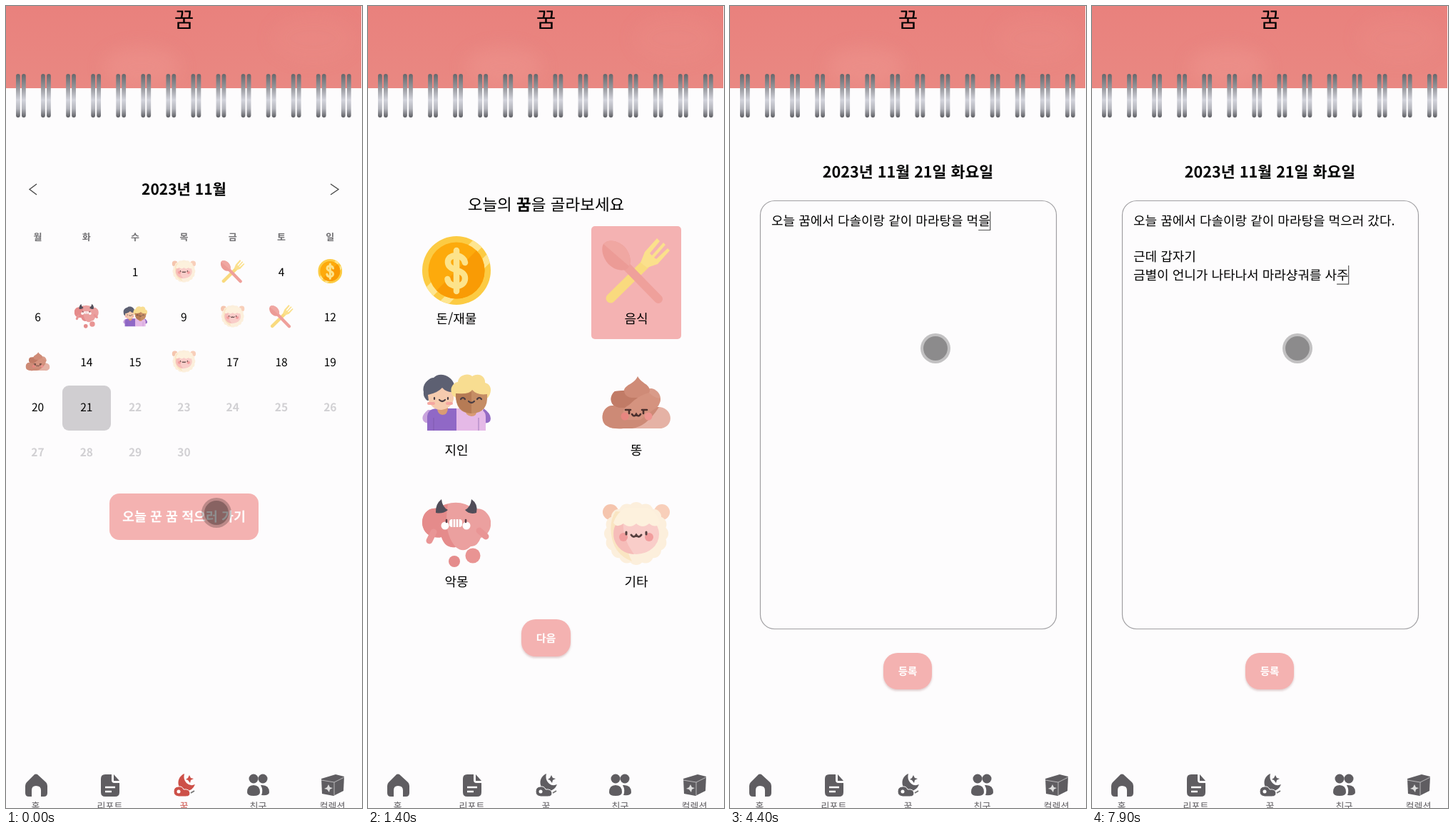
Recreate the animation shown at these times as an HTML page. Size 499 by 1122 pixels, loop 8 s.

```html
<!DOCTYPE html>
<html lang="ko">
<head>
<meta charset="utf-8">
<title>꿈 일기</title>
<style>
html, body { margin: 0; height: 100%; overflow: hidden; background: #fdfcfd; }
svg { display: block; width: 100vw; height: 100vh; }
text { font-family: "Noto Sans CJK KR", "Noto Sans CJK", sans-serif; white-space: pre; text-rendering: geometricPrecision; }
</style>
</head>
<body>
<svg id="stage" viewBox="0 0 499 1122">
<defs>
  <linearGradient id="metal" x2="0" y2="1">
    <stop offset="0" stop-color="#66676b"/><stop offset=".3" stop-color="#929398"/>
    <stop offset=".6" stop-color="#d3d4dc"/><stop offset=".8" stop-color="#b4b5bc"/>
    <stop offset="1" stop-color="#5c5d62"/>
  </linearGradient>
  <linearGradient id="cover" x2="0" y2="1">
    <stop offset="0" stop-color="#e9817d"/><stop offset="1" stop-color="#e98882"/>
  </linearGradient>
  <filter id="soft" x="-50%" y="-50%" width="200%" height="200%"><feGaussianBlur stdDeviation="12"/></filter>
  <filter id="shadow" x="-20%" y="-20%" width="140%" height="150%">
    <feDropShadow dx="0" dy="2" stdDeviation="1.8" flood-color="#a77" flood-opacity=".38"/>
  </filter>
  <clipPath id="coverClip"><path d="M0 0H498V115H0z"/></clipPath>
  <clipPath id="coinClip"><circle cx="48" cy="48" r="48"/></clipPath>

  <symbol id="money" viewBox="0 0 96 96">
    <circle cx="48" cy="48" r="48" fill="#fccb43"/>
    <path d="M-5 82 82 -5 92 7 7 92z M16 100 100 16V32L32 100z" fill="#fee58f" clip-path="url(#coinClip)"/>
    <circle cx="48" cy="48" r="39.5" fill="#fdaa0c"/>
    <path d="M20 76A39.5 39.5 0 0 0 76 20z" fill="#f99b05"/>
    <g fill="none" stroke="#fde38b" stroke-width="8.5" stroke-linecap="round">
      <path d="M48 20V77"/>
      <path d="M60 37C58 24 35 24 36 37C37 50 60 45 60 59C60 73 37 73 35.5 60"/>
    </g>
  </symbol>

  <symbol id="food" viewBox="0 0 96 96">
    <path d="M12 87 66 34" stroke="#f9da7e" stroke-width="13" stroke-linecap="round"/>
    <path d="M54 37 60 22 77 3 81 7 67 24 70 27 86 9 89 12 73 30 76 32 92 17 95 20 78 39 63 44z" fill="#fbe08c"/>
    <path d="M31 39 79 88" stroke="#efa09b" stroke-width="12" stroke-linecap="round"/>
    <path d="M2 11C10 2 27 8 34 18C42 30 41 41 35 46C25 51 10 44 4 32C0 24-1 16 2 11z" fill="#ec9b96"/>
    <path d="M2 11C10 2 27 8 34 18C40 26 41 35 38 42z" fill="#f0a7a2"/>
  </symbol>

  <symbol id="friends" viewBox="0 0 96 96">
    <path d="M8 59Q-3 68 2 75Q7 80 15 75L23 59z" fill="#c9a4dd"/>
    <path d="M86 57Q99 66 95 75Q90 80 80 75z" fill="#956cc5"/>
    <path d="M7 88V68Q8 57 22 57H49V88z" fill="#9068c6"/>
    <path d="M48 88V57H73Q89 57 89 69V88z" fill="#e5b9e7"/>
    <path d="M16 88V70M79 88V70" stroke="#76529f" stroke-width="1.2" opacity=".5"/>
    <path d="M21 56H36Q36 66 28 66Q21 65 21 56zM60 58H77Q77 68 69 68Q60 67 60 58z" fill="#d99b74"/>
    <path d="M2 34C-1 24 9 14 16 14C24 5 42 11 45 24L43 42 7 46Q1 41 2 34z" fill="#5d6072"/>
    <path d="M8 38Q22 35 28 28Q34 35 44 34V44A18 18 0 0 1 9 46z" fill="#f6cbae"/>
    <path d="M43 39C36 29 45 20 50 20C51 9 66 7 70 12C80 6 89 13 88 21C99 24 97 36 92 42H47z" fill="#f8dd91"/>
    <path d="M47 36Q66 38 70 31Q77 39 91 37Q93 64 69 64Q46 64 47 36z" fill="#c58d65"/>
    <path d="M47 39Q48 62 69 64V33Q65 38 47 36z" fill="#b67b55"/>
    <path d="M17 42v2M36 42v2M24 45q4 4 8 0M54 44q3-4 6 0M77 44q3-4 6 0M65 47q4 4 8 0" fill="none" stroke="#4a3d43" stroke-width="2.2" stroke-linecap="round"/>
    <path d="M9 50h7M35 50h6" stroke="#f5a6a0" stroke-width="4" stroke-linecap="round"/>
  </symbol>

  <symbol id="poop" viewBox="0 0 96 96">
    <path d="M14 53C-1 54-4 77 8 82Q14 86 30 85H77C101 87 102 58 81 55z" fill="#e5b2a5"/>
    <path d="M14 53C-1 54-4 77 8 82Q14 86 30 85H42Q62 83 80 55z" fill="#cd8a76"/>
    <path d="M18 33C9 40 11 55 25 56H70C89 52 83 31 69 29z" fill="#d99b89"/>
    <path d="M18 33C9 40 11 55 25 56H39Q57 48 61 29z" fill="#c17b66"/>
    <path d="M50 12C45 23 34 23 31 31Q31 43 47 42Q65 43 67 32C67 23 55 22 50 12z" fill="#cf8b77"/>
    <path d="M38 52Q52 38 66 35Q72 42 82 43Q82 54 72 59Q65 64 54 73H32Q25 58 38 52z" fill="#d5937f"/>
    <circle cx="32" cy="68" r="5.5" fill="#e88680"/><circle cx="65" cy="68" r="5.5" fill="#ee948f"/>
    <path d="M33 59h7M38 59v5M56 59h7M58 59v5M42 65q3 5 6 0q3 5 6 0" fill="none" stroke="#4b302e" stroke-width="2.6" stroke-linecap="round"/>
  </symbol>

  <symbol id="nightmare" viewBox="0 0 96 96">
    <path d="M20 13C5 11-3 27 1 39C5 52 18 55 27 53Q32 69 47 67Q58 76 68 66Q77 67 82 54C96 50 101 31 91 20Q84 11 73 14Q49-4 20 13z" fill="#eba09f"/>
    <path d="M20 13C5 11-3 27 1 39C5 52 18 55 27 53Q32 69 47 67Q29 47 36 7Q27 8 20 13z" fill="#e58b8b"/>
    <path d="M16 46 10 58M80 44 89 52" stroke="#e99595" stroke-width="9" stroke-linecap="round"/>
    <path d="M19 19Q18 7 27 0Q28 11 36 15Q29 21 19 19zM76 19Q79 7 69 0Q68 11 60 15Q66 22 76 19z" fill="#514d59"/>
    <circle cx="32" cy="37" r="5.5" fill="#fff"/><circle cx="62" cy="37" r="5.5" fill="#fff"/>
    <path d="M34 32v-3M61 32v-3" stroke="#5a3e46" stroke-width="2.5" stroke-linecap="round"/>
    <rect x="38" y="28" width="18" height="11" rx="4" fill="#fff"/>
    <path d="M43 28v11M47 28v11M51 28v11" stroke="#d77d7d"/>
    <circle cx="45" cy="87" r="8" fill="#e58c8c"/><circle cx="71" cy="79" r="10.5" fill="#e99493"/>
  </symbol>

  <symbol id="other" viewBox="0 0 96 96">
    <circle cx="12" cy="18" r="11" fill="#f5c5ae"/><circle cx="84" cy="18" r="11" fill="#f8cfba"/>
    <g id="wool" fill="#fcefdc"></g>
    <path d="M19 17Q9 32 14 55Q19 78 42 87Q28 62 34 18z" fill="#fae5c2"/>
    <ellipse cx="48" cy="49" rx="32" ry="28" fill="#f9cdc9"/>
    <path d="M30 26Q13 34 17 56Q24 76 45 77Q27 54 30 26z" fill="#f6bdb9"/>
    <path d="M16 33Q20 20 32 12H64Q78 18 81 34Q75 41 66 34Q57 42 48 34Q39 42 30 34Q21 41 16 33z" fill="#fdf1dd"/>
    <circle cx="30" cy="53" r="6" fill="#f19d9d"/><circle cx="66" cy="53" r="6" fill="#f19d9d"/>
    <path d="M34 46v3M62 46v3M41 50q3.500 5 7 0q3.500 5 7 0" fill="none" stroke="#56403f" stroke-width="3" stroke-linecap="round"/>
  </symbol>
</defs>

<rect width="499" height="1122" fill="#fdfcfd"/>
<g clip-path="url(#coverClip)">
  <rect width="499" height="115" fill="url(#cover)"/>
  <g fill="#f3a19a" opacity=".3" filter="url(#soft)">
    <ellipse cx="190" cy="85" rx="55" ry="28"/>
    <ellipse cx="430" cy="45" rx="60" ry="35" opacity=".4"/>
  </g>
</g>
<g id="heading"></g>
<g id="rings" fill="url(#metal)"></g>
<g id="calendar"></g>
<g id="picker"></g>
<g id="diary"></g>
<g id="nav" fill="#5f5d61"></g>
<g id="touch"><circle r="21" opacity=".23"/><circle r="17" opacity=".28"/></g>
</svg>

<script>
const $ = id => document.getElementById(id);
const label = (x, y, size, str, attrs = '') =>
  `<text x="${x}" y="${y + size * .37}" font-size="${size}" text-anchor="middle" ${attrs}>${str}</text>`;
const icon = (name, x, y, size) =>
  `<use href="#${name}" x="${x - size / 2}" y="${y - size / 2}" width="${size}" height="${size}"/>`;
const button = (x, y, w, h, r, size, str, attrs = '') =>
  `<rect x="${x}" y="${y}" width="${w}" height="${h}" rx="${r}" fill="#f4b2b1" ${attrs}/>` +
  label(x + w / 2, y + h / 2, size, str, 'fill="#fff" font-weight="700"');
const times = (n, fn) => Array.from({ length: n }, (_, i) => fn(i)).join('');

$('heading').innerHTML = label(249.5, 19, 30, '꿈', 'font-weight="500"');
$('wool').innerHTML = '<circle cx="48" cy="48" r="41"/>' + times(16, i => {
  const a = i / 16 * Math.PI * 2;
  return `<circle cx="${48 + 34 * Math.cos(a)}" cy="${48 + 33 * Math.sin(a)}" r="11"/>`;
});
$('rings').innerHTML = times(14, i => [14, 22].map(x =>
  `<rect x="${x + i * 35.07}" y="95" width="5.8" height="61" rx="2.9"/>`).join(''));

// Month view
const dreams = { 2: 'other', 3: 'food', 5: 'money', 7: 'nightmare', 8: 'friends', 10: 'other', 11: 'food', 13: 'poop', 16: 'other' };
const columnX = c => 44.5 + c * 68.3;
$('calendar').innerHTML =
  label(249.5, 256, 21, '2023년 11월', 'font-weight="700"') +
  '<path d="M43 249 33 256.500 43 264M455 249 466 256.500 455 264" fill="none" stroke="#444" stroke-width="1.3"/>' +
  [...'월화수목금토일'].map((d, c) => label(columnX(c), 323, 13, d, 'font-weight="700" fill="#717073"')).join('') +
  '<rect x="79" y="531" width="68" height="63" rx="9" fill="#d0ced1"/>' +
  times(30, i => {
    const day = i + 1, cell = i + 2, x = columnX(cell % 7), y = 372 + Math.floor(cell / 7) * 63;
    return dreams[day] ? icon(dreams[day], x, y - 1, 34)
      : label(x, y, 15.5, day, day > 21 ? 'fill="#d1d0d3" font-weight="700"' : '');
  }) +
  button(145, 682, 209, 65, 14, 18.4, '오늘 꾼 꿈 적으러 가기');

// Dream type picker
const kinds = [['money', '돈/재물'], ['food', '음식'], ['friends', '지인'], ['poop', '똥'], ['nightmare', '악몽'], ['other', '기타']];
$('picker').innerHTML =
  label(249.5, 278, 22.5, '오늘의 <tspan font-weight="700">꿈</tspan>을 골라보세요') +
  '<rect id="choice" y="308" width="126" height="158" rx="5" fill="#f4b2b2"/>' +
  kinds.map(([name, str], i) => {
    const x = i % 2 ? 376 : 124, y = 370 + Math.floor(i / 2) * 184;
    return icon(name, x, y, 96) + label(x, y + 67, 18, str);
  }).join('') +
  button(215, 858, 69, 52, 20, 15, '다음', 'filter="url(#shadow)"');

// Diary page
const LINE = 25.2;
$('diary').innerHTML =
  label(249.5, 232, 21.6, '2023년 11월 21일 화요일', 'font-weight="700"') +
  '<rect x="42.5" y="272.5" width="415" height="599" rx="20" fill="none" stroke="#a09fa2" stroke-width="1.2"/>' +
  times(4, i => `<text class="line" x="58" y="${307 + i * LINE}" font-size="18"></text>`) +
  '<path id="caret" fill="none" stroke="#555" stroke-width="1.2"/>' +
  button(215, 905, 68, 51, 20, 14.5, '등록', 'filter="url(#shadow)"');

// Bottom bar
const tabs = [
  ['홈', '<path d="M40 1075Q42 1074 44 1075L56 1086Q58 1088 58 1091V1101Q58 1106 53 1106H49V1097Q49 1091 42 1091Q36 1091 36 1097V1106H32Q27 1106 27 1101V1091Q27 1088 29 1086z"/>'],
  ['리포트', '<path d="M139 1075H148V1083Q148 1087 152 1087H159V1100Q159 1106 153 1106H139Q133 1106 133 1100V1081Q133 1075 139 1075zM151 1075 159 1084H151z"/><path d="M139 1093h14M139 1099h9" stroke="#fff" stroke-width="2.5"/>'],
  ['꿈', '<path d="M250 1074C238 1079 239 1096 251 1098Q261 1099 265 1089Q258 1092 253 1087Q248 1082 250 1074zM257 1076l2 4 4 1-4 2-1 4-3-4-3-1 3-2z"/><path d="M235 1099Q235 1093 241 1092Q247 1091 249 1096Q257 1095 258 1101Q258 1106 252 1106H242Q235 1105 235 1099z" stroke="#fdfcfd"/><circle cx="242" cy="1099" r="2.5" fill="#fff"/><path d="M259 1101l5-3" stroke="#777" stroke-width="2"/>'],
  ['친구', '<circle cx="347" cy="1081" r="6.5"/><circle cx="360" cy="1081" r="6.5"/><path d="M338 1100Q338 1090 347 1090Q356 1090 356 1100Q356 1105 347 1105Q338 1105 338 1100zM357 1090Q369 1089 369 1100Q369 1105 358 1104Q361 1097 357 1090z"/>'],
  ['컬렉션', '<path d="M442 1081 462 1075 474 1078 473 1098 459 1105 443 1102z"/><path d="M442 1083 460 1086 474 1079M460 1086V1104" fill="none" stroke="#b9b8ba"/><path d="M452 1089l2 4 4 1-4 2-1 4-3-4-4-1 4-2z" fill="#ddd"/>']
];
$('nav').innerHTML = tabs.map(([str, shape], i) => `<g>${shape}${label(41.5 + i * 104, 1119, 13, str)}</g>`).join('');
const dreamTab = $('nav').children[2];

// Korean input: every key press yields one state of the text
const INITIALS = 'ㄱㄲㄴㄷㄸㄹㅁㅂㅃㅅㅆㅇㅈㅉㅊㅋㅌㅍㅎ';
const FINALS = ' ㄱㄲㄳㄴㄵㄶㄷㄹㄺㄻㄼㄽㄾㄿㅀㅁㅂㅄㅅㅆㅇㅈㅊㅋㅌㅍㅎ';
const HANGUL = 0xAC00;
const isHangul = ch => /[가-힣]/.test(ch);

function keyStates(before, chunk) {
  const states = [before];
  let text = before;
  for (const ch of chunk) {
    if (isHangul(ch)) {
      const code = ch.charCodeAt(0) - HANGUL, final = code % 28;
      const first = INITIALS[Math.floor(code / 588)];
      const last = text.slice(-1), slot = FINALS.indexOf(first);
      const open = isHangul(last) && (last.charCodeAt(0) - HANGUL) % 28 === 0 && slot > 0;
      states.push(open ? text.slice(0, -1) + String.fromCharCode(last.charCodeAt(0) + slot) : text + first);
      if (final) states.push(text + String.fromCharCode(HANGUL + code - final));
    }
    text += ch;
    states.push(text);
  }
  return states;
}

let typed = '';
const typing = [
  [2200, 3100, '오늘 꿈에서 다'], [3100, 4000, '솔이랑 같이 마라탕'],
  [4000, 4350, '을 먹으'], [4350, 4900, '러 갔다.'],
  [4900, 5900, '\n\n근데 갑자기\n금'], [5900, 6500, '별이 언니가 '],
  [6600, 7000, '나타나서 '], [7100, 7900, '마라샹궈를 사주']
].map(([start, end, chunk]) => {
  const states = keyStates(typed, chunk);
  typed += chunk;
  return { start, end, states };
});

function textAt(t) {
  const part = typing.filter(p => t >= p.start).pop();
  if (!part) return '';
  const progress = Math.min(1, (t - part.start) / (part.end - part.start));
  return part.states[Math.ceil(progress * (part.states.length - 1))];
}

const lineNodes = document.querySelectorAll('.line');

function drawDiary(t) {
  const lines = textAt(t).split('\n');
  lineNodes.forEach((node, i) => node.textContent = lines[i] || '');
  const row = lines.length - 1, line = lines[row], node = lineNodes[row];
  const widthOf = count => count ? node.getSubStringLength(0, count) : 0;
  const composing = /[가-힣ㄱ-ㅎ]$/.test(line);
  const end = 58 + widthOf(line.length), top = 287.5 + row * LINE;
  const start = composing ? 58 + widthOf(line.length - 1) : end;
  $('caret').setAttribute('d', t < 1900 ? '' : `M${end} ${top}V${top + 26}H${start}`);
}

// Touches: start, end, from x, y, to x, y
const touches = [
  [0, 700, 295, 709, 284, 719], [900, 1300, 375, 385, 375, 385],
  [1500, 1700, 250, 885, 250, 885], [1900, 8000, 288, 479, 288, 479]
];

function drawTouch(t) {
  const hit = touches.find(([start, end]) => t >= start && t < end);
  $('touch').style.display = hit ? '' : 'none';
  if (!hit) return;
  const [start, end, x0, y0, x1, y1] = hit, p = (t - start) / (end - start);
  $('touch').setAttribute('transform', `translate(${x0 + (x1 - x0) * p} ${y0 + (y1 - y0) * p})`);
  $('touch').setAttribute('opacity', end < 8000 ? Math.min(1, (end - t) / 150) : 1);
}

function draw(now) {
  const t = Math.floor(now % 8000 / 100) * 100;
  const screen = t < 200 ? 'calendar' : t < 1700 ? 'picker' : 'diary';
  for (const id of ['calendar', 'picker', 'diary']) $(id).style.display = id === screen ? '' : 'none';
  dreamTab.setAttribute('fill', t < 200 ? '#cd5048' : '#5f5d61');
  $('choice').setAttribute('x', t < 1000 ? 61 : 313);
  if (screen === 'diary') drawDiary(t);
  drawTouch(t);
}

const begin = performance.now();
function loop() {
  draw(performance.now() - begin);
  requestAnimationFrame(loop);
}
loop();
</script>
</body>
</html>
```
